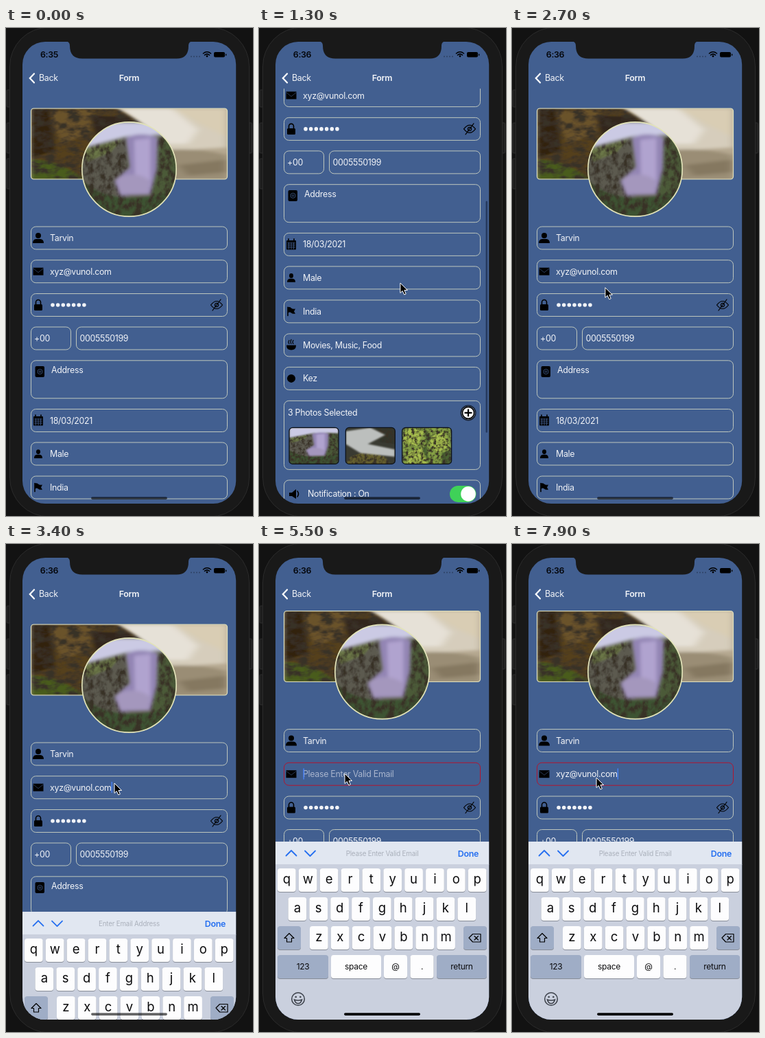
Animation of 360x710 px, one loop 8000 ms. Source, as an HTML page:

```html
<!DOCTYPE html>
<html lang="en">
<head>
<meta charset="utf-8">
<title>Form</title>
<style>
html, body { margin: 0; height: 100%; overflow: hidden; background: #141414; }
svg { display: block; width: 100vw; height: 100vh; }
text { font: 12.4px Inter, sans-serif; letter-spacing: -.3px; fill: #f1f3f7; white-space: pre; }
.mid { text-anchor: middle; }
.bold { font-weight: 600; }
.box { fill: none; stroke: #bdc6bd; }
.line { fill: none; stroke: #000; stroke-width: 1.6; stroke-linecap: round; stroke-linejoin: round; }
.thin { stroke-width: 1.2; }
.blue { fill: none; stroke: #256ff0; stroke-width: 1.8; stroke-linecap: round; stroke-linejoin: round; }
.key { font-size: 18.5px; fill: #0b0b0d; letter-spacing: 0; }
.small { font-size: 12px; }
</style>
</head>
<body>
<svg id="stage" viewBox="0 0 360 710"></svg>
<script>
const EMAIL = 'xyz@vunol.com';
const TYPED = [6200, 6400, 6450, 6500, 6600, 6800, 6900, 7100, 7200, 7400, 7500, 7600, 7700];
const LOOP = 8000;

const rect = (x, y, w, h, r, attrs) =>
  `<rect x="${x}" y="${y}" width="${w}" height="${h}" rx="${r}" ${attrs}/>`;
const path = (d, attrs = '') => `<path d="${d}" ${attrs}/>`;
const circle = (x, y, r, attrs = '') => `<circle cx="${x}" cy="${y}" r="${r}" ${attrs}/>`;
const text = (x, y, s, attrs = '') => `<text x="${x}" y="${y + 4.5}" ${attrs}>${s}</text>`;
const group = (body, attrs) => `<g ${attrs}>${body}</g>`;
const at = (x, y, body) => group(body, `transform="translate(${x} ${y})"`);
const box = (y, h = 33, x = 36.5, w = 286, attrs = '') => rect(x, y, w, h, 7, `class="box" ${attrs}`);
const field = (y, icon, label) => box(y) + at(47, y + 16.5, icon) + text(64, y + 16.5, label);

// Icons, each drawn around its own centre
const person = circle(0, -3.5, 4) + path('M-8 7.500Q-8 2-3 1.500L3 1.500Q8 2 8 7.500Z');
const icons = {
  person,
  mail: path('M-7.500-5.500H7.500V5.500H-7.500Z') +
    path('M-7.500-4.500L0 1.500L7.500-4.500', 'fill="none" stroke="#3a517a" stroke-width=".7"'),
  lock: rect(-6, -1, 12, 9, 1.5, '') + path('M-3.500 0V-4A3.500 3.500 0 0 1 3.500-4V0', 'class="line"'),
  eye: path('M-8.500 0Q0-11 8.500 0Q0 11-8.500 0ZM-6 8L6-8', 'class="line thin"') +
    circle(0, 0, 2.6, 'class="line thin"'),
  book: rect(-6.5, -8, 13.5, 16, 2, '') + circle(.5, 0, 3.6, 'fill="none" stroke="#425f90" stroke-width=".8"') +
    circle(.5, 0, 1.3, 'fill="none" stroke="#425f90" stroke-width=".8"'),
  calendar: rect(-7, -6, 14, 13.5, 1, '') + path('M-4-8V-5M4-8V-5', 'class="line"') +
    path('M-6-2H6M-6 1H6M-6 4H6M-3.500-3V7M0-3V7M3.500-3V7', 'stroke="#425f90" stroke-width=".8"'),
  male: group(person, 'transform="scale(.75 .85)"'),
  flag: path('M-5-6V6', 'class="line"') + path('M-5-6Q-2-7 0-5T6-4L4 0L6 3Q2 4 0 2T-5 2Z'),
  bowl: path('M-7 0H7Q7 7 0 7T-7 0Z') + path('M-3-2Q-5-4-3-7M0-2Q-2-4 0-8M3-2Q1-4 3-7', 'class="line thin"'),
  dot: circle(0, 0, 6),
  bell: path('M-7-2H-3L3-7V7L-3 3H-7Z') + path('M5-4Q8 0 5 4', 'class="line"'),
  check: circle(0, 0, 8.7, 'class="line"') + path('M-4 0L-1 3L4-3', 'class="line"'),
};

// Landscape tones, drawn in a unit square: smooth water, grained rock and plants
const soft = body => group(body, 'filter="url(#soft)"');
const rough = body => group(body, 'filter="url(#rough)"');
const shade = (d, fill) => path(d, `fill="${fill}"`);
const banner = shade('M0 0H1V1H0Z', '#b5a890') +
  soft(shade('M.4 0H1V.55L.7 .6Z', '#d6cdbc') + shade('M.46 0H.72L.85 .3L.8 .5L.62 .5Z', '#e6e1d7') +
    shade('M.72 0H1V.4L.88 .25Z', '#d9cdb4') + shade('M.6 .62Q.8 .52 1 .66V1H.6Z', '#9a8d75') +
    shade('M.75 .8L1 .72V.9L.8 .95Z', '#857860')) +
  rough(shade('M0 0H.44Q.56 .18 .62 .35L.6 1H0Z', '#54401f') + shade('M.08 .05L.32 0L.3 .35L.16 .5Z', '#6b5229') +
    shade('M.3 .1L.5 .12L.56 .3L.34 .5Z', '#33261a') + shade('M0 0H.1L.12 .6L0 .7Z', '#30230f') +
    shade('M0 .72Q.14 .72 .27 1H0Z', '#4a5c1e'));
const falls = shade('M0 0H1V1H0Z', '#55593f') +
  rough(shade('M0 .25L.45 .16L.5 .8H0Z', '#5b5a50') + shade('M.02 .28L.42 .18L.3 .32L.05 .42Z', '#6b7646') +
    shade('M.78 .18L1 .12V.85L.7 .76Z', '#4c5a38') + shade('M0 .62Q.2 .8 .5 .8T1 .7V1H0Z', '#3d5330')) +
  soft(shade('M0 0H1V.16L.78 .14L.5 .15L0 .28Z', '#cbcae4') +
    shade('M.46 .17Q.6 .1 .8 .16L.79 .5L.72 .77L.4 .78L.34 .62L.5 .48Z', '#9385b4') +
    shade('M.55 .19L.72 .17L.72 .68L.56 .7Z', '#b0a3cf') +
    shade('M.36 .6Q.55 .5 .72 .62L.7 .76H.4Z', '#a497bd'));
const river = shade('M0 0H1V1H0Z', '#393a31') +
  rough(shade('M.1 .8L.45 .62L.8 .8L.9 1H0Z', '#66612f') + shade('M.6 0H1V.45L.7 .4Z', '#33362c')) +
  soft(shade('M0 .1L.5 0L.8 .2L.45 .45L1 .6V.8L.3 .7L0 .45Z', '#bcbfbd'));
const leaves = rough(shade('M0 0H1V1H0Z', '#85a044') +
  shade('M.1 0L.45 .1L.3 .5L0 .4ZM.5 .3L.85 .1L.95 .5L.7 .7ZM.1 .7L.4 .55L.5 1H.1Z', '#a9c050') +
  shade('M.45 0L.6 .3L.4 .6L.55 1M.8 .7L1 .6V1H.8Z', '#4c6430'));
const picture = (art, x, y, w, h, clip) =>
  group(group(art, `transform="translate(${x} ${y}) scale(${w} ${h})"`), `clip-path="url(#${clip})"`);
const photo = (art, i) => {
  const x = 44 + i * 82.3;
  return `<clipPath id="photo${i}">${rect(x, 837.5, 72, 53, 5, '')}</clipPath>` +
    picture(art, x, 837.5, 72, 53, 'photo' + i) +
    rect(x, 837.5, 72, 53, 5, 'fill="none" stroke="#0c1118" stroke-width="1.3"');
};

const dots = Array.from({ length: 7 }, (_, i) => circle(68 + i * 7.65, 403, 2.8, 'fill="#f1f3f7"')).join('');
const plus = circle(305, 816, 11.5, 'fill="#0a0f18" opacity=".75"') + circle(305, 816, 9.5, 'fill="#fff"') +
  circle(305, 816, 8.5, 'class="line"') +
  path('M300.500 816H309.500M305 811.500V820.500', 'class="line" style="stroke-width:2.3"');

const form =
  picture(banner, 36.5, 117, 286, 103, 'bannerClip') +
  rect(36.5, 117, 286, 103, 4, 'fill="none" stroke="#dfe0bd" stroke-width="1.2"') +
  picture(falls, 111, 136.5, 138, 138, 'roundClip') +
  circle(179.5, 205.5, 68.7, 'fill="none" stroke="#e2e3b9" stroke-width="1.7"') +
  field(289, icons.person, 'Tarvin') +
  box(337.7, 33, 36.5, 286, 'id="emailBox"') + at(47, 354.2, icons.mail) +
  text(64, 354.2, '', 'id="email"') +
  box(386.5) + at(47, 403, icons.lock) + dots + at(307, 403, icons.eye) +
  rect(64.5, 346, 1.3, 16, 0, 'id="caret" fill="#4a86ff"') +
  box(435, 33, 36.5, 58) + text(41, 451.5, '+00') +
  box(435, 33, 102.5, 220) + text(107.5, 451.5, '0005550199') +
  box(483.8, 55) + at(49, 500, icons.book) + text(66, 497.5, 'Address') +
  field(554.5, icons.calendar, '18/03/2021') +
  field(603, icons.male, 'Male') +
  field(652, icons.flag, 'India') +
  field(701, icons.bowl, 'Movies, Music, Food') +
  field(749.5, icons.dot, 'Kez') +
  box(798.5, 100) + text(42, 816, '3 Photos Selected') + plus + photo(falls, 0) + photo(river, 1) + photo(leaves, 2) +
  box(914, 41) + at(51, 934, icons.bell) + text(71, 934, 'Notification : On') +
  rect(278, 922, 38.5, 24, 12, 'fill="#3fd158"') + circle(305, 934, 10.8, 'fill="#fff"') +
  box(970) + at(51, 987, icons.check) + text(68, 987, 'Terms and Conditions') +
  rect(117, 1014.5, 125, 37, 4, 'fill="#f6dfe5" stroke="#0d0d12" stroke-width="1.6"') +
  text(179.5, 1033.7, 'Submit', 'class="mid" style="font-size:15px;font-weight:500;fill:#000"');

// Keyboard
const key = (x, y, w, label, cls = 'key', fill = '#fdfdfe') =>
  rect(x, y + 1, w, 34, 4, 'fill="#888d98"') + rect(x, y, w, 34, 4, `fill="${fill}"`) +
  text(x + w / 2, y + (cls === 'key' ? 17.5 : 16.5), label, `class="mid ${cls}" style="fill:#0b0b0d"`);
const row = (letters, x, y) => [...letters].map((c, i) => key(x + i * 30.87, y, 26.7, c)).join('');
const GRAY = '#9fadc6';
const keyboard =
  rect(24, 433, 312, 34, 0, 'fill="#e1e7f1"') + rect(24, 466, 312, 228, 0, 'fill="#cad0de"') +
  path('M39.500 453.500L47 446L54.500 453.500', 'class="blue"') +
  path('M67 446.500L74.500 454L82 446.500', 'class="blue" id="next"') +
  text(179.5, 449.5, '', 'id="hint" class="mid" style="font-size:9.8px;fill:#aab0bb;letter-spacing:-.2px"') +
  text(320, 450, 'Done', 'class="bold" text-anchor="end" style="fill:#256ff0"') +
  row('qwertyuiop', 27, 472) + row('asdfghjkl', 42.5, 514) + row('zxcvbnm', 74, 556) +
  key(27, 556, 34, '', 'small', GRAY) + key(298, 556, 34, '', 'small', GRAY) +
  path('M44 566.500L51 573.500H47.500V579H40.500V573.500H37Z', 'class="line thin"') +
  path('M306 573L311.500 567.500H323V579H311.500ZM314 570.500L319.500 576M319.500 570.500L314 576', 'class="line thin"') +
  key(27, 598, 74, '123', 'small', GRAY) + key(105, 598, 73, 'space', 'small') +
  key(182, 598, 34, '@', 'small') + key(220.5, 598, 34, '.', 'small') +
  key(259, 598, 73, 'return', 'small', GRAY) +
  group(circle(57, 662, 9.3) + path('M51.500 663Q57 665 62.500 663Q61 668.500 57 668.500T51.500 663Z'),
    'fill="none" stroke="#3d424b" stroke-width="1.5"') +
  circle(53.7, 659, 1.3, 'fill="#3d424b"') + circle(60.3, 659, 1.3, 'fill="#3d424b"');

const status =
  text(63, 38.5, '', 'id="clock" class="mid bold" style="fill:#05070c"') +
  [270, 274, 278, 282].map(x => circle(x, 41.5, .9, 'opacity=".35"')).join('') +
  path('M287.500 37Q293 32.500 298.500 37M289.500 39.300Q293 36.500 296.500 39.300', 'class="line"') + circle(293, 41, 1.4) +
  rect(303, 35, 16, 7.5, 2, '') + rect(320, 37.5, 1.3, 2.8, .6, '');
const nav = path('M41 66.500L34.800 73L41 79.500', 'fill="none" stroke="#fff" stroke-width="2.2" stroke-linecap="round"') +
  text(48, 72.5, 'Back') + text(179.5, 72.5, 'Form', 'class="mid bold"');
const button = (x, y, h) => rect(x, y, 5, h, 1.5, 'fill="#1d1d1d" stroke="#353535" stroke-width=".8"');

document.getElementById('stage').innerHTML = `<defs>
  <filter id="soft"><feGaussianBlur stdDeviation=".02"/></filter>
  <filter id="rough">
    <feGaussianBlur in="SourceGraphic" stdDeviation=".012" result="base"/>
    <feTurbulence type="fractalNoise" baseFrequency="16 12" numOctaves="3" seed="4"/>
    <feColorMatrix values="0 0 0 0 .04  0 0 0 0 .03  0 0 0 0 .02  3 0 0 0 -1.1"/>
    <feComposite in2="base" operator="atop"/>
  </filter>
  <clipPath id="screen">${rect(24, 20, 311.2, 672, 33, '')}</clipPath>
  <clipPath id="view"><path d="M24 88H336V692H24Z"/></clipPath>
  <clipPath id="bannerClip">${rect(36.5, 117, 286, 103, 4, '')}</clipPath>
  <clipPath id="roundClip">${circle(179.5, 205.5, 68.7)}</clipPath></defs>` +
  rect(0, 0, 360, 710, 0, 'fill="#121212"') +
  button(1, 90, 25) + button(1, 138, 44) + button(1, 190, 44) + button(353.5, 138, 44) +
  rect(5.5, -1, 349, 712, 57, 'fill="#191919" stroke="#2b2b2b"') +
  group(rect(24, 20, 312, 672, 0, 'fill="#425f90"') +
    group(group(form, 'id="form"'), 'clip-path="url(#view)"') +
    rect(330.5, 103, 2.5, 337, 1.2, 'id="bar" fill="#172544"') +
    nav + status +
    path('M87 19Q93 20 93 26Q93 44.500 111 44.500H249Q266 44.500 266 26Q266 20 272 19Z', 'fill="#191919"') +
    group(keyboard, 'id="keys"') +
    rect(124, 682.3, 111, 3.6, 1.8, 'id="home"'), 'clip-path="url(#screen)"') +
  path('M0 0V14.500L3.300 11.500L5.800 17L8.300 16L6 10.500H10.500Z', 'id="mouse" stroke="#fff" stroke-width="1"');

const ui = {};
for (const el of document.querySelectorAll('#stage [id]')) ui[el.id] = el;
const set = (el, attrs) => Object.entries(attrs).forEach(([k, v]) => el.setAttribute(k, v));

// Eased value from keys of [time, value]
function track(keys, t) {
  if (t <= keys[0][0]) return keys[0][1];
  for (let i = 1; i < keys.length; i++) {
    const [t0, a] = keys[i - 1], [t1, b] = keys[i];
    if (t < t1) {
      const p = (t - t0) / (t1 - t0);
      return a + (b - a) * p * p * (3 - 2 * p);
    }
  }
  return keys.at(-1)[1];
}
const SCROLL = [[100, 0], [750, 414], [1000, 414], [1700, 15], [2000, 0], [4750, 0], [4950, 19.5]];
const BAR = [[100, 0], [200, .65], [2200, .65], [2500, 0]];
const KEYS_Y = [[3200, 262], [3550, 0]];
const MOUSE_X = [[100, 215], [800, 213], [1000, 213], [1650, 197], [2000, 197], [2650, 134.5], [3000, 158], [3800, 158], [4450, 74], [4850, 74], [5300, 125], [5500, 125], [5700, 123]];
const MOUSE_Y = [[100, 560], [750, 220], [1000, 220], [1650, 559.5], [2000, 559.5], [2650, 379.5], [3000, 348], [3800, 348], [4450, 445], [4850, 445], [5300, 334], [5500, 334], [5700, 340]];

function draw(t) {
  const scroll = track(SCROLL, t);
  const invalid = t >= 4750, password = invalid && t < 5400;
  const prompt = invalid ? 'Please Enter Valid Email' : 'Enter Email Address';
  const count = t < 5500 ? Math.max(0, 13 - Math.max(0, Math.floor((t - 3650) / 50))) : TYPED.filter(x => x <= t).length;

  set(ui.form, { transform: `translate(0 ${-scroll})` });
  const barY = 103 + scroll * .581;
  set(ui.bar, { y: barY, height: Math.min(337, 663 - barY), opacity: track(BAR, t) });
  ui.clock.textContent = t < 100 ? '6:35' : '6:36';

  ui.email.textContent = count ? EMAIL.slice(0, count) : prompt;
  ui.email.style.fill = count ? '' : '#a8b4cd';
  ui.emailBox.style.stroke = invalid ? '#b3152f' : '';
  const end = count ? ui.email.getComputedTextLength() : .5;
  set(ui.caret, { x: password ? 119 : 64 + end, y: password ? 395 : 346, opacity: t < 3200 ? 0 : 1 });

  ui.hint.textContent = password ? 'Enter Password' : prompt;
  set(ui.next, { opacity: t >= 4550 && t < 4800 ? .2 : 1 });
  set(ui.keys, { transform: `translate(0 ${track(KEYS_Y, t)})` });
  set(ui.home, { opacity: t >= 1500 && t < 2000 ? .95 : t < 3500 ? .6 : t < 4700 ? .85 : 1 });
  set(ui.mouse, {
    transform: `translate(${track(MOUSE_X, t)} ${track(MOUSE_Y, t)})`,
    visibility: t < 100 ? 'hidden' : 'visible',
  });
}

const start = performance.now();
function tick() {
  draw((performance.now() - start) % LOOP);
  requestAnimationFrame(tick);
}
draw(0);
requestAnimationFrame(tick);
</script>
</body>
</html>
```
